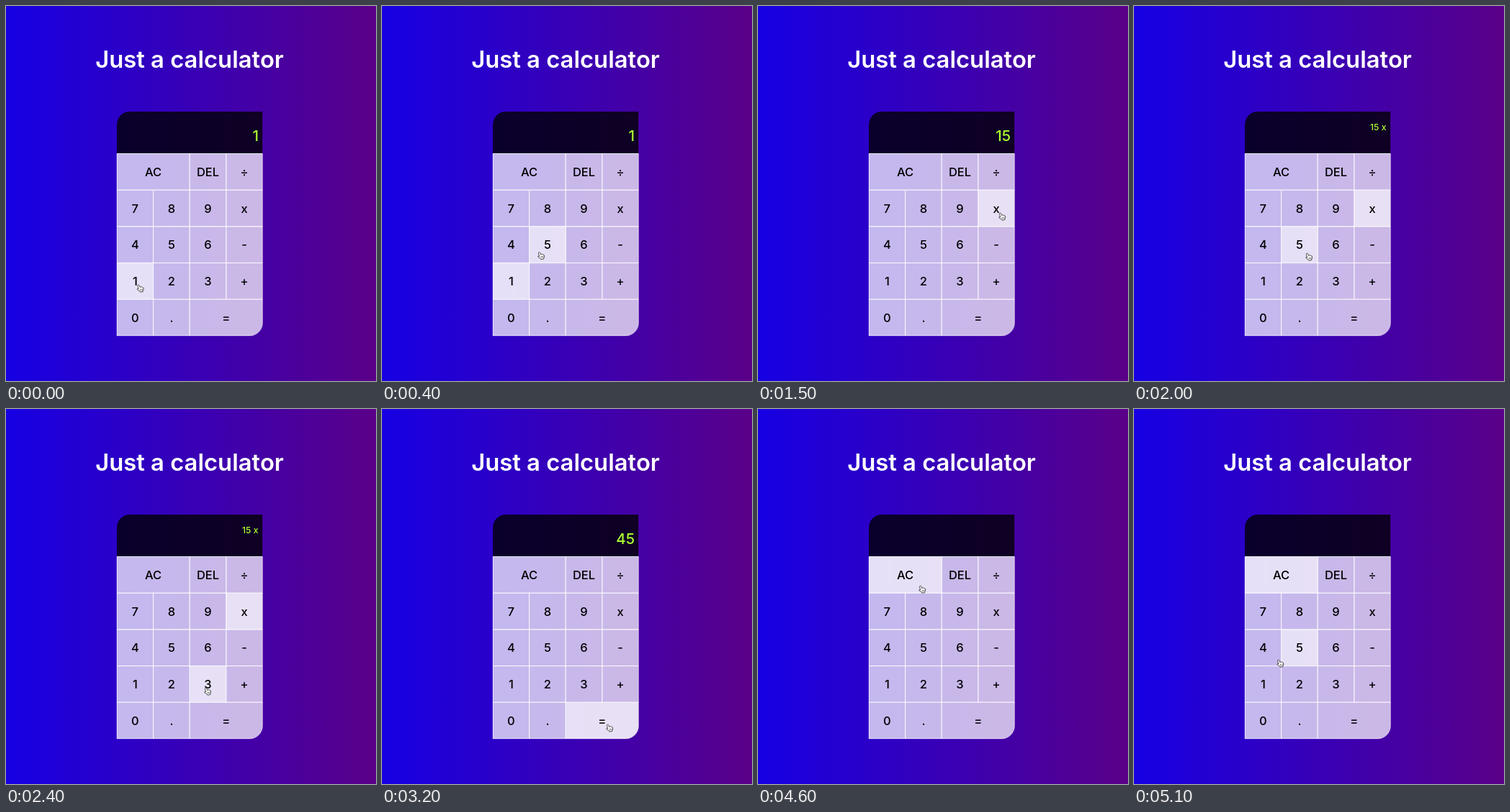
An HTML page with a canvas for the animation above (5200 ms loop, 514 by 522 pixels).

```html
<!DOCTYPE html>
<html lang="en">
<head>
<meta charset="utf-8">
<title>Just a calculator</title>
<style>
  html, body { margin: 0; height: 100%; overflow: hidden; background: #3800b6; }
  canvas { display: block; }
</style>
</head>
<body>
<canvas id="stage" width="514" height="522"></canvas>
<script>
const ctx = document.getElementById('stage').getContext('2d');
const LOOP = 5200, STEP = 100, HOVER_LAG = 20;
const LEFT = 154, TOP = 147, KEYS_TOP = 205.5, CELL = 50.6, ROW = 50.7;
const WIDTH = CELL * 4, HEIGHT = KEYS_TOP - TOP + ROW * 5;

// A repeated label makes one wide key
const rows = ['AC AC DEL ÷', '7 8 9 x', '4 5 6 -', '1 2 3 +', '0 . = ='];
const keys = rows.flatMap((row, r) => {
  const labels = row.split(' ');
  return [...new Set(labels)].map(label => ({
    label,
    x: LEFT + labels.indexOf(label) * CELL,
    y: KEYS_TOP + r * ROW,
    w: labels.filter(other => other === label).length * CELL
  }));
});

// Pointer rests, one on each pressed key
const one = [186.5, 393], five = [236, 341], times = [339, 293],
      three = [280, 393], equals = [316, 444], clear = [228, 251];

// Each move is a quadratic curve: start time, end time, from, bend, to
const moves = [
  [0, 500, one, [195, 355], five],
  [600, 1500, five, [371, 325], times],
  [1700, 2400, times, [165, 370], three],
  [2600, 3000, three, [290, 430], equals],
  [3900, 4300, equals, [292, 233], clear],
  [4800, 5200, clear, [224, 313], one]
];
const focusAt = [[0, '1'], [500, '5'], [1500, 'x'], [2500, '3'], [3100, '='], [4500, 'AC']];
const displayAt = [
  [0, '', '1'], [600, '', '15'], [1600, '15 x', ''],
  [2600, '15 x', '3'], [3200, '', '45'], [4600, '', '']
];

const current = (list, t) => list.filter(item => item[0] <= t).pop();

function pointerAt(t) {
  t = (t + LOOP) % LOOP;
  const [start, end, from, bend, to] = current(moves, t);
  const k = Math.min(1, (t - start) / (end - start)), j = 1 - k;
  return from.map((a, i) => j * j * a + 2 * j * k * bend[i] + k * k * to[i]);
}

function hoveredAt(t) {
  const [x, y] = pointerAt(t), tip = y - 5.5;
  return keys.find(k => x >= k.x && x < k.x + k.w && tip >= k.y && tip < k.y + ROW);
}

function text(str, x, y, size, weight, color, align = 'center') {
  ctx.font = `${weight} ${size}px Inter, sans-serif`;
  ctx.fillStyle = color;
  ctx.textAlign = align;
  ctx.fillText(str, x, y);
}

const hand = new Path2D(`M-3.6-3.6 C-3.7-5-1.9-5.4-1.4-4.1 L-.5-1.6
  Q2-3 3-1.3 Q5-1.6 4.6 1.5 L3.7 3.7 L3.8 4.6 L-.2 5.1 L-.5 4.2
  L-4.2 1.6 Q-4.5-.3-2.3 .9 Z`);

function drawPointer([x, y]) {
  ctx.save();
  ctx.translate(x, y);
  ctx.fillStyle = '#fff';
  ctx.fill(hand);
  ctx.strokeStyle = '#222';
  ctx.lineWidth = .8;
  ctx.stroke(hand);
  ctx.lineWidth = .5;
  for (let i = 0; i < 3; i++) ctx.strokeRect(i * 1.5, 1, .1, 2);
  ctx.restore();
}

function draw(t) {
  const bg = ctx.createLinearGradient(0, 0, 514, 0);
  bg.addColorStop(0, '#1600e4');
  bg.addColorStop(1, '#5a0088');
  ctx.fillStyle = bg;
  ctx.fillRect(0, 0, 514, 522);
  text('Just a calculator', 255, 86, 32.8, 600, '#fff');

  ctx.save();
  ctx.beginPath();
  ctx.roundRect(LEFT, TOP, WIDTH, HEIGHT, [18, 0, 18, 0]);
  ctx.clip();
  ctx.fillStyle = 'rgba(0,0,0,.78)';
  ctx.fillRect(LEFT, TOP, WIDTH, KEYS_TOP - TOP);

  const hovered = hoveredAt(t - HOVER_LAG), focus = current(focusAt, t)[1];
  for (const k of keys) {
    const lit = k === hovered || k.label === focus;
    ctx.fillStyle = `rgba(255,255,255,${lit ? .88 : .72})`;
    ctx.fillRect(k.x, k.y, k.w, ROW);
  }
  ctx.strokeStyle = 'rgba(255,255,255,.75)';
  ctx.lineWidth = 1;
  for (const k of keys) ctx.strokeRect(k.x, k.y, k.w, ROW);
  ctx.restore();

  // Rounded rim
  ctx.beginPath();
  ctx.roundRect(LEFT, KEYS_TOP, WIDTH, ROW * 5, [0, 0, 18, 0]);
  ctx.strokeStyle = 'rgba(255,255,255,.4)';
  ctx.stroke();

  for (const k of keys) text(k.label, k.x + k.w / 2, k.y + 31.5, 16.5, 500, '#000');

  const [, previous, value] = current(displayAt, t);
  text(previous, 350.5, 173, 12.2, 500, '#adff2f', 'right');
  text(value, 351, 188, 20.5, 500, '#adff2f', 'right');
  drawPointer(pointerAt(t));
}

const begin = performance.now();
function tick() {
  const t = (performance.now() - begin) % LOOP;
  draw(Math.floor(t / STEP) * STEP);
  requestAnimationFrame(tick);
}
tick();
</script>
</body>
</html>
```
